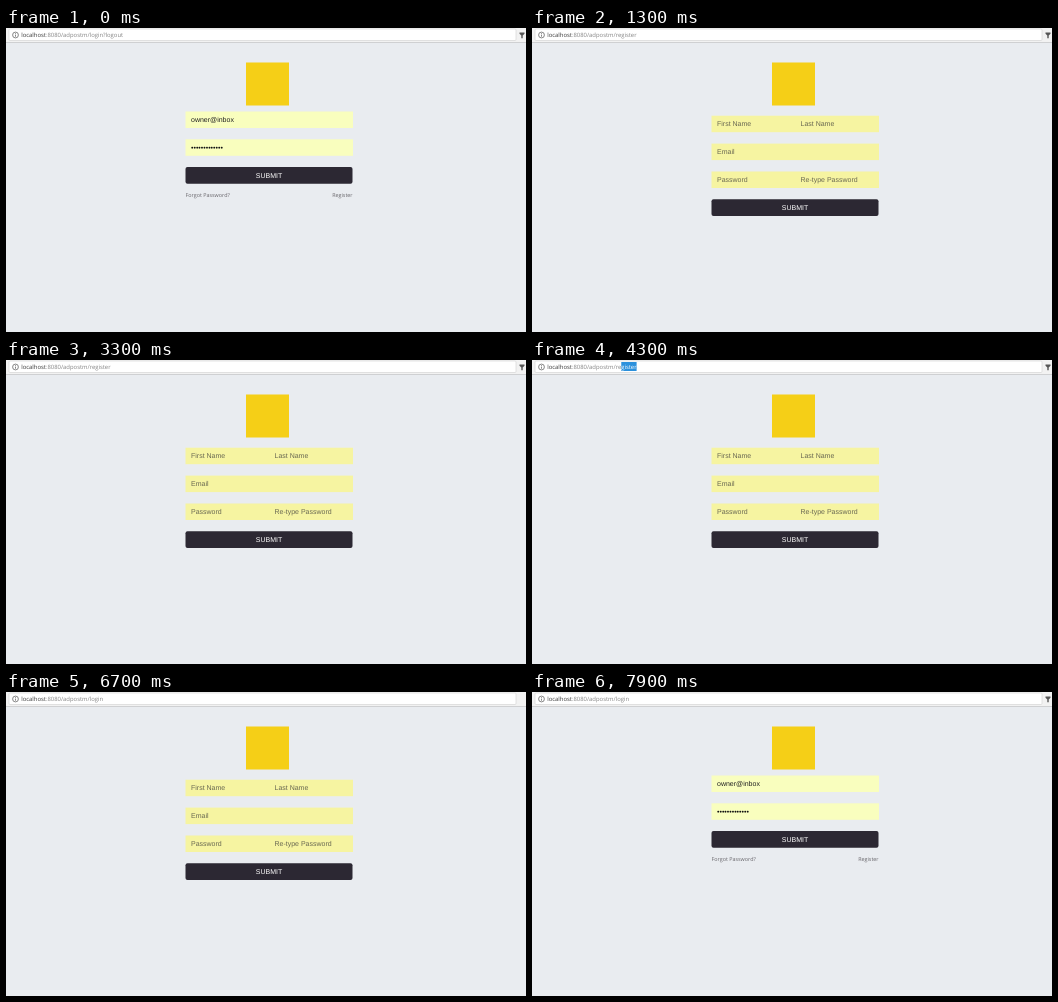
Write an HTML page that moves like this. It is 520 px wide and 304 px high and loops after 8 s.

```html
<!DOCTYPE html>
<html lang="en">
<head>
<meta charset="utf-8">
<title>Login and register</title>
<style>
  html, body { margin: 0; width: 100%; height: 100%; overflow: hidden; background: #e9ecf0; }
  svg { display: block; text-rendering: geometricPrecision; }
  text { font: 7px "Liberation Sans", Arial, sans-serif; white-space: pre; }
  #url, .link { font-family: "Open Sans", "Noto Sans", sans-serif; }
  #url { font-size: 5.9px; }
  .link { font-size: 5.4px; fill: #68666b; }
  .button rect { fill: #2c2833; }
  .button text { fill: #fff; text-anchor: middle; }
  #login .field { fill: #f9febe; }
  #register .field { fill: #f6f4a1; }
  #register .hint { fill: #696852; }
</style>
</head>
<body>
<svg width="520" height="304" viewBox="0 0 520 304">
  <rect width="520" height="304" fill="#e9ecf0"/>

  <!-- address bar -->
  <rect width="520" height="15" fill="#f2f2f2"/>
  <rect x="3" y="1" width="507" height="11.5" rx="1" fill="#fff" stroke="#d0d0d0" stroke-width=".6"/>
  <rect y="14" width="520" height="1" fill="#cfd0d2"/>
  <g id="info" fill="none" stroke="#555" stroke-width=".7">
    <circle cx="9.5" cy="7" r="2.9"/>
    <path d="M9.5 6.6v2.1M9.5 5.1v.8"/>
  </g>
  <path id="page" d="M7.3 4.1h2.9l1.6 1.6v4.2H7.3zM10.2 4.1v1.6h1.6" fill="none" stroke="#666" stroke-width=".6"/>
  <path id="tool" d="M513.5 4.5h5v1.2l-1.8 1.8v2.7h-1.4V7.500l-1.8-1.800z" fill="#555"/>
  <rect id="mark" y="2" height="9" fill="#2b90dc"/>
  <text id="url" x="15.2" y="9.100"><tspan fill="#3a3a3a">localhost</tspan><tspan id="path"></tspan><tspan id="picked" fill="#fff"></tspan></text>
  <rect id="caret" y="2.500" width=".7" height="8.500" fill="#222"/>

  <rect x="240" y="34.500" width="43" height="43" fill="#f5cf17"/>

  <g id="login">
    <rect class="field" x="179.500" y="83.500" width="167.500" height="16.500"/>
    <rect class="field" x="179.500" y="111.300" width="167.500" height="16.500"/>
    <text x="185" y="93.800" fill="#222">owner@inbox</text>
    <text x="185" y="121.500" fill="#111">•••••••••••••</text>
    <g class="button">
      <rect x="179.500" y="139" width="167" height="16.800" rx="2"/>
      <text x="263" y="149.900">SUBMIT</text>
    </g>
    <text class="link" x="179.500" y="169.200">Forgot Password?</text>
    <text class="link" x="326.200" y="169.200">Register</text>
    <rect id="line" x="326.200" y="170" width="20.400" height=".6" fill="#68666b"/>
  </g>

  <g id="register">
    <rect class="field" x="179.500" y="87.700" width="167.500" height="16.500"/>
    <rect class="field" x="179.500" y="115.600" width="167.500" height="16.500"/>
    <rect class="field" x="179.500" y="143.500" width="167.500" height="16.500"/>
    <text class="hint" x="185" y="98.300">First Name</text>
    <text class="hint" x="268.500" y="98.300">Last Name</text>
    <text class="hint" x="185" y="126.200">Email</text>
    <text class="hint" x="185" y="154.100">Password</text>
    <text class="hint" x="268.500" y="154.100">Re-type Password</text>
    <g class="button">
      <rect x="179.500" y="171.200" width="167" height="16.800" rx="2"/>
      <text x="263" y="182.100">SUBMIT</text>
    </g>
  </g>
</svg>
<script>
const $ = id => document.getElementById(id);
const show = (id, on) => $(id).setAttribute('visibility', on ? 'visible' : 'hidden');
const within = (t, from, to) => t >= from && t < to;
const base = ':8080/adpostm/';
const url = $('url');

function draw(t) {
  const registering = within(t, 1300, 6900);
  const typing = within(t, 5700, 6700);
  const selecting = within(t, 4100, 5700);

  const word = t < 1300 ? 'login?logout' : t < 5700 ? 'register' : t < 5900 ? '' : 'login';
  const from = !selecting ? word.length : t < 4300 ? 4 : t < 4500 ? 2 : 0;
  $('path').textContent = base + word.slice(0, from);
  $('path').setAttribute('fill', typing ? '#3a3a3a' : '#858585');
  $('picked').textContent = word.slice(from);

  const end = 15.2 + url.getComputedTextLength();
  if (selecting) {
    const x = url.getStartPositionOfChar(9 + base.length + from).x;
    $('mark').setAttribute('x', x);
    $('mark').setAttribute('width', end - x);
  }
  $('caret').setAttribute('x', end);

  show('mark', selecting);
  show('caret', typing || within(t, 3900, 4100));
  show('info', !typing);
  show('page', typing);
  show('tool', !within(t, 5700, 6900));
  show('login', !registering);
  show('register', registering);
  show('line', within(t, 500, 1300));
}

function tick() {
  draw(performance.now() % 8000);
  requestAnimationFrame(tick);
}
tick();
</script>
</body>
</html>
```
